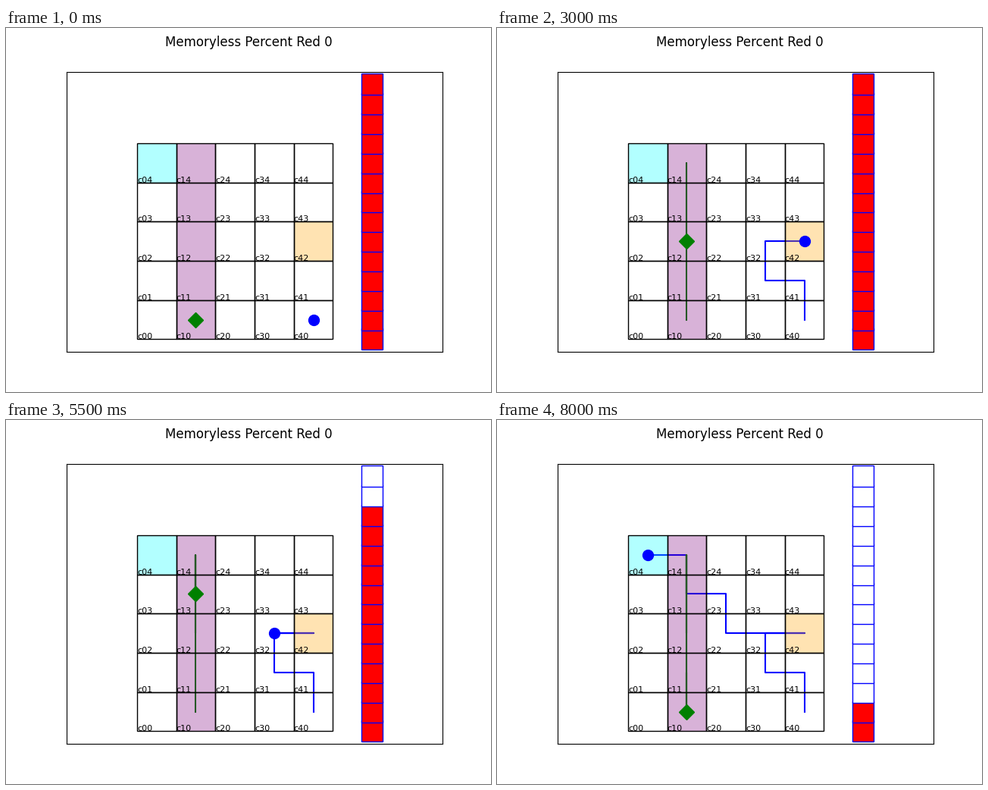
A matplotlib script for the animation above (8.5 s loop, 640x480 px).

```python
import matplotlib.pyplot as plt
from matplotlib.animation import FuncAnimation
from matplotlib.patches import Rectangle

SIZE = 5
CAPACITY = 14
CHARGER = (4, 2)
TINTS = {(0, 4): "cyan", CHARGER: "orange"}
TINTS.update({(1, row): "purple" for row in range(SIZE)})

# Cell visited at each step
ROBOT = [(4, 0), (4, 1), (3, 1), (3, 1), (3, 1), (3, 2), (4, 2), (4, 2), (4, 2),
         (3, 2), (4, 2), (3, 2), (2, 2), (2, 3), (1, 3), (1, 4), (0, 4)]
PATROL = [(1, row) for row in (0, 1, 2, 3, 4, 3, 2, 3, 4, 3, 4, 3, 2, 1, 0, 1, 0)]


def energy_levels(path):
    """A move costs two units, waiting costs one, the charger refills."""
    levels = [CAPACITY]
    for old, new in zip(path, path[1:]):
        cost = 1 if old == new else 2
        levels.append(CAPACITY if new == CHARGER else levels[-1] - cost)
    return levels


def centers(path):
    return [x + 0.5 for x, _ in path], [y + 0.5 for _, y in path]


ENERGY = energy_levels(ROBOT)

fig = plt.figure(figsize=(6.4, 4.8), dpi=100)
fig.suptitle("Memoryless Percent Red 0", fontsize=12)
ax = fig.add_axes([0.125, 0.11, 0.775, 0.77])
ax.set_xticks([])
ax.set_yticks([])

# Equal scale on both axes, centred on the grid and the gauge
y_span = 6.5 * 1.1
x_span = y_span * 496 / 369.6
ax.set_xlim(3 - x_span / 2, 3 + x_span / 2)
ax.set_ylim(3.25 - y_span / 2, 3.25 + y_span / 2)

for col in range(SIZE):
    for row in range(SIZE):
        tint = TINTS.get((col, row))
        if tint:
            ax.add_patch(Rectangle((col, row), 1, 1, fc=tint, ec="none",
                                   alpha=0.3, zorder=3))
        ax.add_patch(Rectangle((col, row), 1, 1, fill=False, ec="black",
                               lw=1, zorder=4))
        ax.text(col, row, f"c{col}{row}", fontsize=8, zorder=5)

gauge = [ax.plot(6, i / 2, "s", ms=20, mfc="red", mec="blue", zorder=2)[0]
         for i in range(CAPACITY)]


def make_agent(color, marker, order):
    trail, = ax.plot([], [], color=color, lw=1.5, zorder=order)
    head, = ax.plot([], [], color=color, marker=marker, ms=10, zorder=order + 5)
    return trail, head


agents = [(ROBOT, *make_agent("blue", "o", 1)),
          (PATROL, *make_agent("green", "D", 1.5))]


def update(step):
    for path, trail, head in agents:
        xs, ys = centers(path[:step + 1])
        trail.set_data(xs, ys)
        head.set_data(xs[-1:], ys[-1:])
    for i, cell in enumerate(gauge):
        cell.set_markerfacecolor("red" if i < ENERGY[step] else "white")


anim = FuncAnimation(fig, update, frames=len(ROBOT), interval=500,
                     repeat=True, repeat_delay=0)
plt.show()
```
